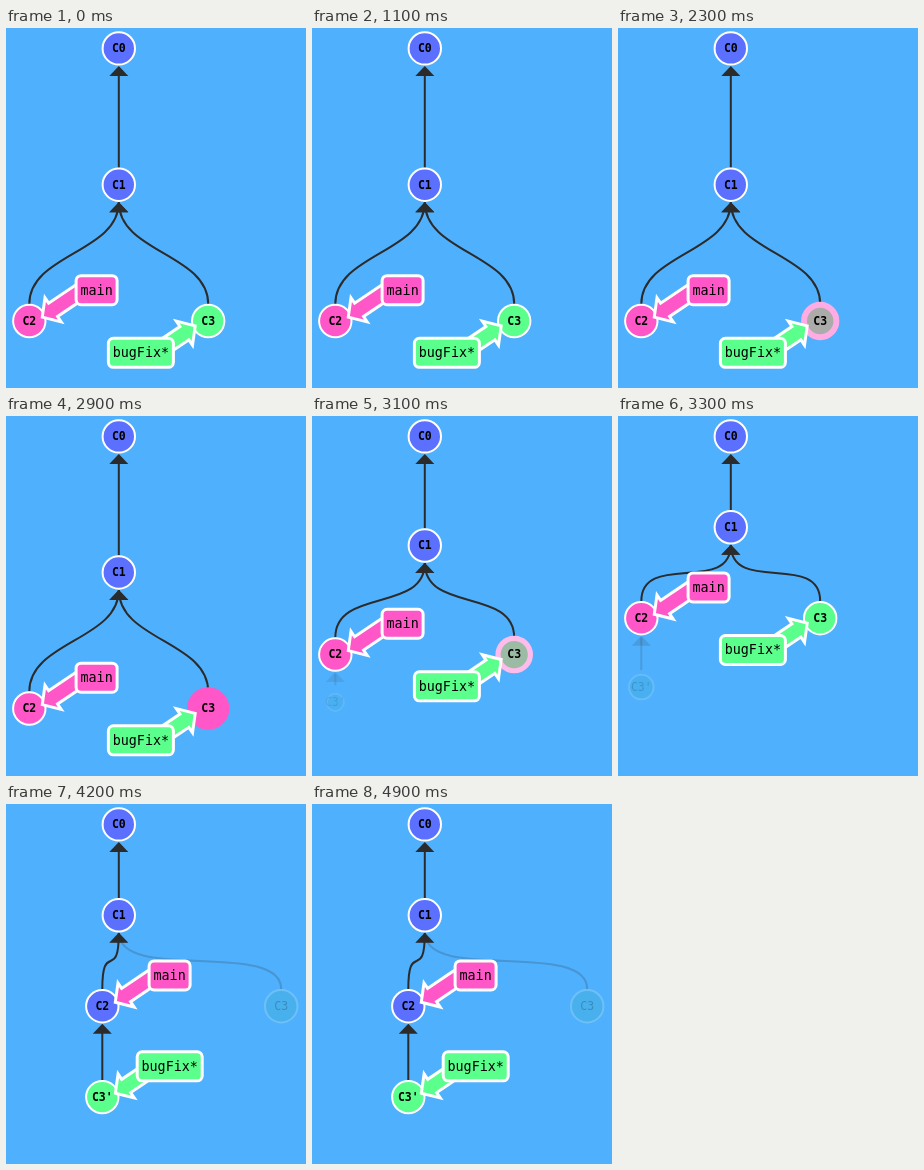
Recreate the animation shown at these times as an HTML page with a canvas. Size 300 px wide and 360 px high, loop 5 s.

```html
<!DOCTYPE html>
<html lang="en">
<head>
<meta charset="utf-8">
<title>Rebase</title>
<style>
  html, body { margin: 0; width: 100%; height: 100%; overflow: hidden; background: #4fb0fd; }
  canvas { display: block; width: 300px; height: 360px; }
</style>
</head>
<body>
<canvas id="stage"></canvas>
<script>
const LOOP = 5000;
const RADIUS = 16.2;
const BLUE = [91, 112, 254], PINK = [255, 86, 200], GREEN = [90, 255, 140];
const FADED = [40, 177, 170], WHITE = [255, 255, 255];
const FONT = '"DejaVu Sans Mono", monospace';

const canvas = document.getElementById('stage');
const ctx = canvas.getContext('2d');
const dpr = window.devicePixelRatio || 1;
canvas.width = 300 * dpr;
canvas.height = 360 * dpr;

const lerp = (a, b, k) => a + (b - a) * k;
const mix = (a, b, k) => a.map((v, i) => lerp(v, b[i], k));
const css = c => `rgb(${c.map(Math.round).join(',')})`;
const progress = (t, start, length) => Math.min(1, Math.max(0, (t - start) / length));
const ease = k => k < 0.5 ? 2 * k * k : 1 - 2 * (1 - k) ** 2;

function bounce(k) {
  const n = 7.5625, d = 2.75;
  if (k < 1 / d) return n * k * k;
  if (k < 2 / d) return n * (k - 1.5 / d) ** 2 + 0.75;
  if (k < 2.5 / d) return n * (k - 2.25 / d) ** 2 + 0.9375;
  return n * (k - 2.625 / d) ** 2 + 0.984375;
}

function polygon(points) {
  ctx.beginPath();
  points.forEach(([x, y]) => ctx.lineTo(x, y));
  ctx.closePath();
}

function write(text, x, y, size, weight) {
  ctx.font = `${weight} ${size}px ${FONT}`;
  ctx.fillStyle = '#000';
  ctx.fillText(text, x, y + 0.9);
}

function edge(child, parent) {
  const tail = child.y - 17, tip = parent.y + 17.5, bend = 50;
  ctx.globalAlpha = child.alpha ?? 1;
  ctx.strokeStyle = ctx.fillStyle = '#2b2b2b';
  ctx.lineWidth = 2;
  ctx.beginPath();
  ctx.moveTo(child.x, tail);
  if (child.x === parent.x) ctx.lineTo(parent.x, tip + 2);
  else ctx.bezierCurveTo(child.x, tail - bend, parent.x, tip + bend, parent.x, tip);
  ctx.stroke();
  polygon([[parent.x, tip], [parent.x + 9.5, tip + 10], [parent.x - 9.5, tip + 10]]);
  ctx.fill();
  ctx.globalAlpha = 1;
}

function commit({ name, x, y, fill, r = RADIUS, ring = WHITE, width = 2, alpha = 1 }) {
  ctx.globalAlpha = alpha;
  ctx.beginPath();
  ctx.arc(x, y, r, 0, 2 * Math.PI);
  ctx.fillStyle = css(fill);
  ctx.fill();
  ctx.strokeStyle = css(ring);
  ctx.lineWidth = width;
  ctx.stroke();
  write(name, x, y, 11.5, alpha < 1 ? 'normal' : 'bold');
  ctx.globalAlpha = 1;
}

// side: 1 points the arrow down-left, -1 up-right; values between shrink it
function branch(name, x, y, w, color, side) {
  const cos = Math.cos(0.593), sin = Math.sin(0.593);
  const outline = [[0, 0], [13, 14.5], [13, 8], [55, 8], [55, -8], [13, -8], [13, -14.5]];
  ctx.fillStyle = css(color);
  ctx.strokeStyle = '#fff';
  ctx.lineWidth = 3;
  polygon(outline.map(([a, b]) => [
    x + side * (-54.3 + a * cos + b * sin),
    y + side * (26.9 - a * sin + b * cos)
  ]));
  ctx.fill();
  ctx.stroke();
  ctx.beginPath();
  ctx.roundRect(x - w / 2, y - 14.5, w, 29, 5);
  ctx.fill();
  ctx.stroke();
  write(name, x, y, 13.4, 'normal');
}

function draw(t) {
  const rise = ease(progress(t, 2880, 400));
  const glow = ease(progress(t, 2040, 528)) * (1 - rise);
  const birth = t < 2890 ? 0 : bounce(progress(t, 2890, 800));
  const shift = ease(progress(t, 3702, 400));

  const row = lerp(136.3, 90.9, rise), slide = 73 * shift;
  const level = n => 20.4 + n * row;
  const fadeOut = lerp(1, 0.2, shift);
  const fadeIn = lerp(0.2 * birth, 1, shift);

  const c0 = { name: 'C0', x: 112.8, y: level(0), fill: BLUE };
  const c1 = { name: 'C1', x: 112.8, y: level(1), fill: BLUE };
  const c2 = { name: 'C2', x: 23.3 + slide, y: level(2), fill: mix(PINK, BLUE, shift) };
  const c3 = {
    name: 'C3', x: 202.2 + slide, y: level(2), alpha: fadeOut,
    fill: mix(mix(GREEN, PINK, glow), FADED, shift),
    ring: mix(WHITE, PINK, glow), width: lerp(2, 10, glow)
  };
  const copy = {
    name: "C3'", x: c2.x, y: c2.y + 90.9 * birth, alpha: fadeIn,
    fill: mix(FADED, GREEN, shift), r: RADIUS * birth
  };

  ctx.setTransform(dpr, 0, 0, dpr, 0, 0);
  ctx.fillStyle = '#4fb0fd';
  ctx.fillRect(0, 0, 300, 360);
  ctx.textAlign = 'center';
  ctx.textBaseline = 'middle';

  edge(c1, c0);
  edge(c2, c1);
  edge(c3, c1);
  if (birth > 0) {
    edge(copy, c2);
    commit(copy);
  }
  [c0, c1, c2, c3].forEach(commit);

  branch('main', c2.x + 67.3, c2.y - 30.8, 41, PINK, 1);
  branch('bugFix*', lerp(134.9, 163.7, shift), lerp(level(2) + 31.8, level(3) - 30.8, shift),
    65, GREEN, lerp(-1, 1, shift));
}

function tick() {
  draw(performance.now() % LOOP);
  requestAnimationFrame(tick);
}
tick();
</script>
</body>
</html>
```
